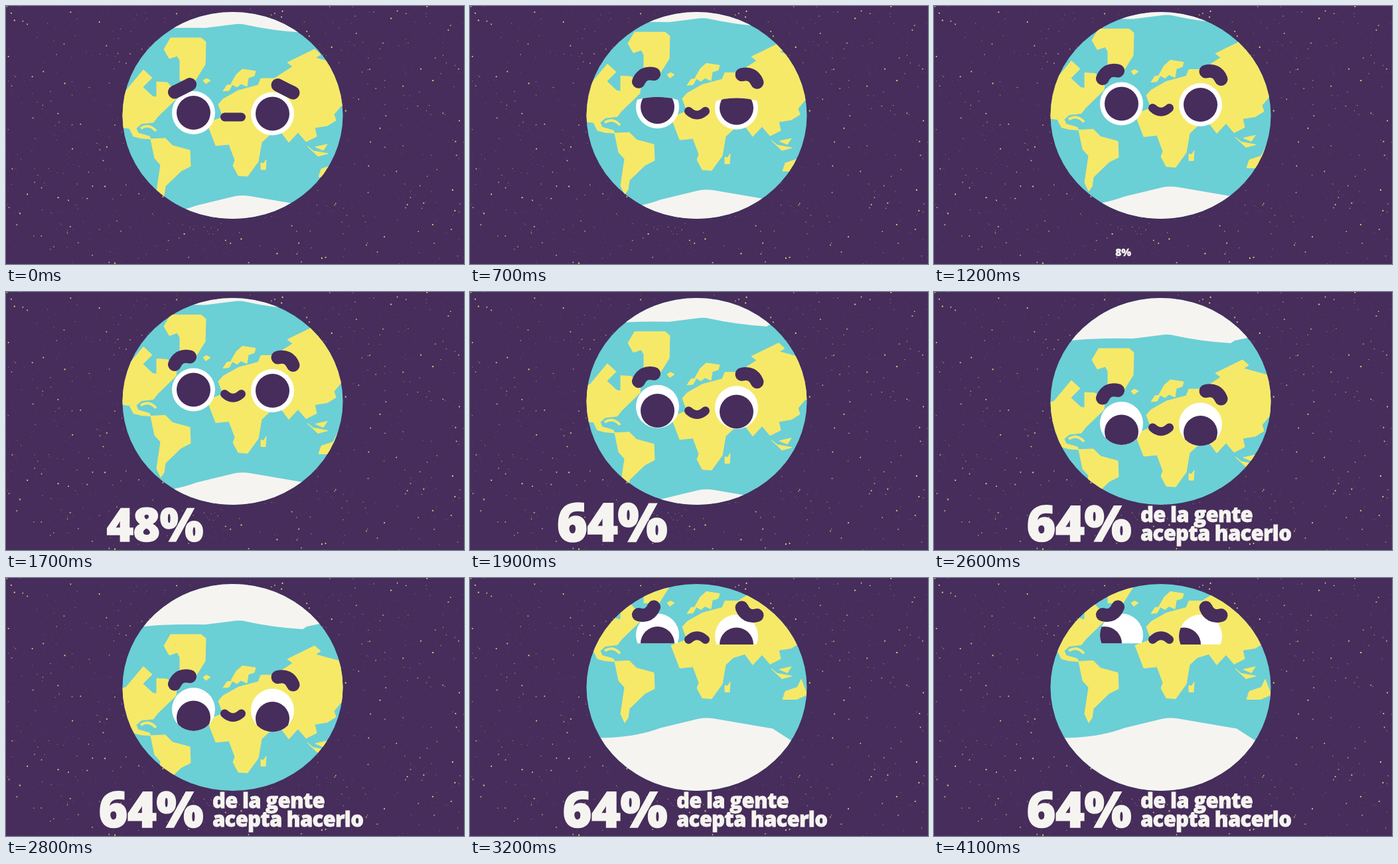
Recreate the animation shown at these times as an HTML page. Size 690 by 388 pixels, loop 4.2 s.

```html
<!DOCTYPE html>
<html lang="es">
<head>
<meta charset="utf-8">
<title>Planeta</title>
<style>
  html, body { margin: 0; width: 100%; height: 100%; overflow: hidden; background: #462d5b; }
  svg { display: block; width: 690px; height: 388px; }
  text { font-family: "Open Sans", "Noto Sans", sans-serif; font-weight: 800; fill: #f6f4f0; stroke: #f6f4f0; }
  .land { fill: #f6e968; stroke: #f6e968; stroke-linejoin: round; }
  .ice { fill: #f6f4f0; }
  .line { fill: none; stroke: #462d5b; stroke-linecap: round; }
</style>
</head>
<body>
<svg viewBox="0 0 690 388">
  <defs>
    <clipPath id="disc"><ellipse cx="341.5" cy="164.5" rx="166" ry="155.5"/></clipPath>
  </defs>
  <rect width="690" height="388" fill="#462d5b"/>
  <g id="stars"></g>
  <g clip-path="url(#disc)">
    <rect x="170" width="345" height="330" fill="#6bcfd6"/>
    <g id="world">
      <g class="land">
        <!-- Greenland, Iceland -->
        <path d="M238 65L248 48H294L301 54L300 88L285 112H262V82L258 75L246 79Z"/>
        <path d="M297 112L302 109L308 112L301 117Z"/>
        <!-- Americas, Cuba -->
        <path d="M150 140L181 127L207 96L220 108L206 122L221 136L227 137V114L243 115L257 130L256 140L228 167L222 175L204 177L196 184L199 191L216 196L218 200L204 199L192 196L186 184L150 180Z"/>
        <path d="M203 184Q215 176 226 188" fill="none" stroke-width="4"/>
        <path d="M218 200L240 199L251 210L277 217L278 241L264 248L240 271L238 285L233 292L227 279L233 239L224 229Z"/>
        <!-- Britain, Scandinavia -->
        <path d="M327 128L333 119L341 118L336 127Z"/>
        <path d="M339 117L347 103L356 95L376 98L374 105L365 108L363 121L354 117L348 122Z"/>
        <!-- Eurasia and Africa -->
        <path d="M320 148L327 140L350 127L380 119L384 109L404 109L426 95L432 91L424 85L465 65L474 73L466 78L488 84L530 95V150H505L494 163L497 172L484 180L465 183L468 196L452 204L440 190L426 205L414 189L397 194L385 205L380 234L364 256L350 255L342 240L345 232L336 208L316 210L303 176L327 167Z"/>
        <!-- Madagascar, islands, Australia -->
        <path d="M384 236L388 237L392 231L391 246H384Z"/>
        <path d="M454 211L463 218L485 222L470 226Z"/>
        <path d="M466 212L484 208L478 217Z"/>
        <path d="M471 257L475 245L493 239L499 227L508 250L492 257Z"/>
      </g>
      <path class="ice" d="M150 -80V36H207Q240 32 300 33L340 28Q352 26 360 28Q400 37 447 40L453 36L530 20V-80Z"/>
      <path class="ice" d="M150 318L197 315Q250 314 287 300L345 286Q356 284 368 286L456 301L484 319L530 330V460H150Z"/>
      <g id="face"></g>
    </g>
  </g>
  <text id="count" x="297" y="375" font-size="75" letter-spacing="-.5" stroke-width="1.6" text-anchor="end"></text>
  <g id="caption" font-size="31" letter-spacing="-.7" stroke-width=".8">
    <text x="311" y="346">de la gente</text>
    <text x="311" y="374">acepta hacerlo</text>
  </g>
</svg>
<script>
const LOOP = 4200, STEP = 100;
const $ = id => document.getElementById(id);

function add(parent, tag, attrs = {}) {
  const el = document.createElementNS("http://www.w3.org/2000/svg", tag);
  for (const k in attrs) el.setAttribute(k, attrs[k]);
  return parent.appendChild(el);
}

// Starfield: mostly faint specks, a few larger yellow ones
let seed = 77;
const rnd = () => (seed = (seed * 16807) % 2147483647) / 2147483647;
for (let i = 0; i < 1900; i++) {
  const glow = rnd() ** 7;
  add($("stars"), "circle", {
    cx: rnd() * 690, cy: rnd() * 388, r: 0.4 + 0.75 * glow,
    fill: glow > 0.1 ? "#f2dd78" : "#d8c4c0", opacity: 0.35 + 0.6 * glow
  });
}

// Face
const face = $("face");
const eyes = [[282.5, 160.5], [401.5, 162]].map(([x, y], i) => {
  const lid = add(add(face, "clipPath", { id: "lid" + i }), "path");
  add(add(face, "clipPath", { id: "ball" + i }), "circle", { cx: x, cy: y, r: 32.5 });
  const outer = add(face, "g", { "clip-path": `url(#lid${i})` });
  const inner = add(outer, "g", { "clip-path": `url(#ball${i})` });
  add(inner, "circle", { cx: x, cy: y, r: 34, fill: "#fff" });
  return { x, y, lid, pupil: add(inner, "circle", { r: 25.5, fill: "#462d5b" }) };
});
const stroke = width => add(face, "path", { class: "line", "stroke-width": width });
const brows = [stroke(20), stroke(20)], mouth = stroke(13);
brows[1].setAttribute("transform", "translate(686.5 1) scale(-1 1)");

// Progress from 0 to 1 between two times
const linear = (t, a, b) => Math.min(1, Math.max(0, (t - a) / (b - a)));
const smooth = (t, a, b) => { const u = linear(t, a, b); return u * u * (3 - 2 * u); };
const slow = (t, a, b) => 1 - (1 - linear(t, a, b)) ** 2;

// mood: 0 worried, 1 happy, -1 sad
function drawFace(t) {
  const mood = smooth(t, 400, 700) - 2 * smooth(t, 2800, 3200);
  const lift = 7 * Math.max(0, mood), bow = 11 * mood;
  for (const brow of brows)
    brow.setAttribute("d", `M254 ${129.5 - lift}Q${265.5 - bow * 0.47} ${124 - lift - bow * 0.88} 277 ${118 - lift}`);
  mouth.setAttribute("d", `M329.5 167Q342 ${167 + 11.5 * mood} 354.5 167`);

  const top = -42 + 28.5 * Math.sin(Math.PI * linear(t, 400, 900));
  const low = 42 - 29.5 * smooth(t, 2800, 3200);
  const lookX = 25 * smooth(t, 3400, 3600) - 50 * smooth(t, 3700, 4100);
  const lookY = 12.5 * smooth(t, 1700, 2100);
  for (const { x, y, lid, pupil } of eyes) {
    const l = x - 36, r = x + 36;
    lid.setAttribute("d", `M${l} ${y + top + 6}Q${x} ${y + top - 6} ${r} ${y + top + 6}V${y + low}H${l}Z`);
    pupil.setAttribute("cx", x + lookX);
    pupil.setAttribute("cy", y + lookY);
  }
}

function draw(t) {
  const shift = -13.5 * smooth(t, 400, 900) + 50.5 * smooth(t, 1700, 2100) - 111.5 * smooth(t, 2800, 3200);
  $("world").setAttribute("transform", `translate(0 ${shift})`);
  drawFace(t);

  const size = 1.1 * slow(t, 1100, 2100) - 0.1 * smooth(t, 2100, 2400);
  $("count").textContent = Math.round(64 * linear(t, 1100, 1900)) + "%";
  $("count").style.display = size > 0 ? "" : "none";
  $("count").setAttribute("transform", `translate(297 376) scale(${size}) translate(-297 -376)`);
  $("caption").setAttribute("transform", `translate(${390 * (1 - slow(t, 2100, 2600))} 0)`);
}

const start = performance.now();
function tick() {
  const t = (performance.now() - start) % LOOP;
  draw(Math.floor(t / STEP) * STEP);
  requestAnimationFrame(tick);
}
tick();
</script>
</body>
</html>
```
